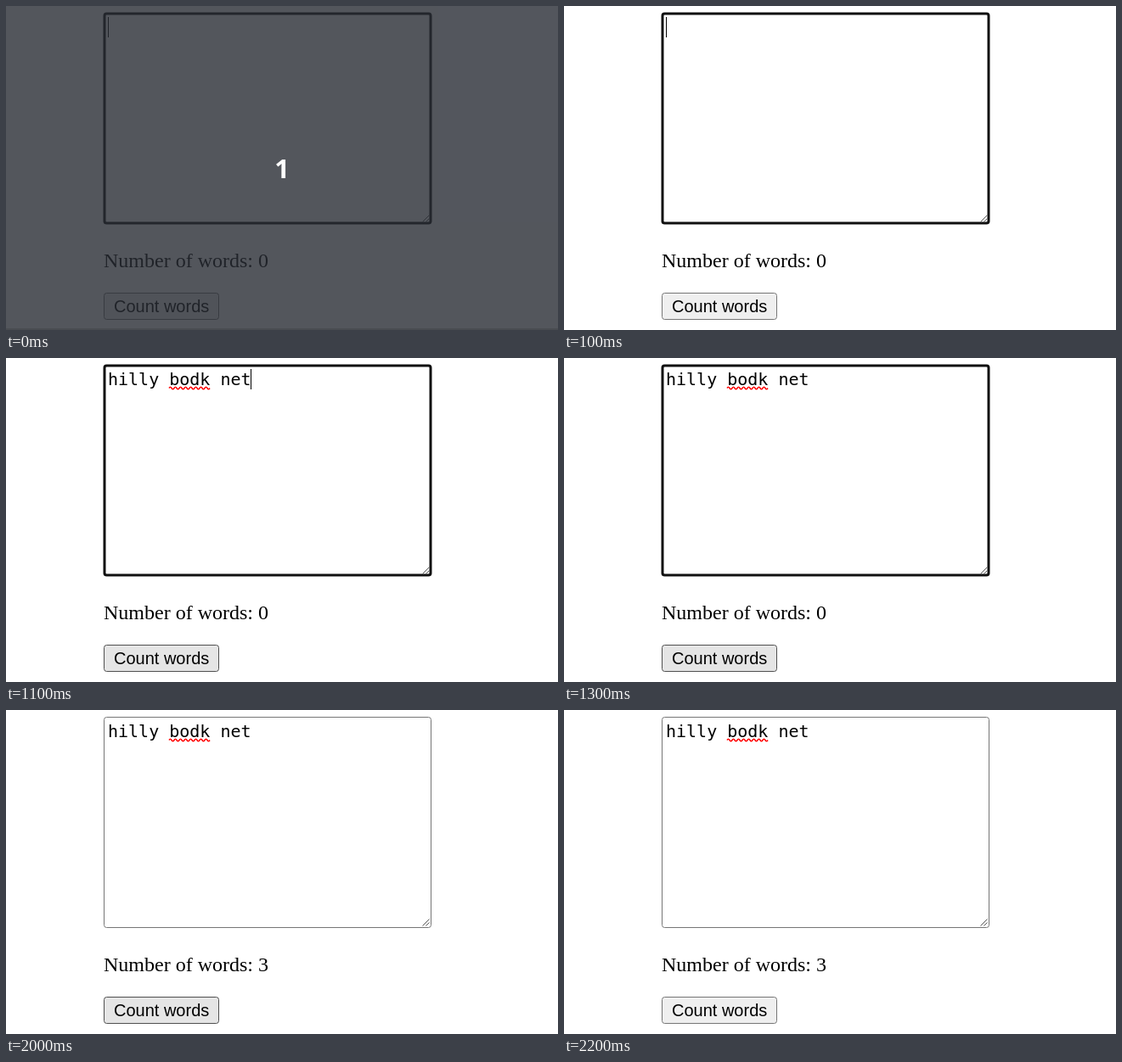
Recreate the animation shown at these times as an HTML page. Size 650 by 382 pixels, loop 3300 ms.

```html
<!DOCTYPE html>
<html lang="en">
<head>
<meta charset="utf-8">
<title>Word counter</title>
<style>
  html, body { margin: 0; width: 100%; height: 100%; overflow: hidden; background: #fff; }
  svg { display: block; }
  text { white-space: pre; }
  .mono { font: 20px "DejaVu Sans Mono", monospace; }
  .serif { font: 24px "Liberation Serif", serif; }
  .sans { font: 20px "Liberation Sans", sans-serif; }
  .count { font: 600 31px "Noto Sans", sans-serif; }
</style>
</head>
<body>
<svg width="650" height="382" viewBox="0 0 650 382">
  <rect id="box" x="115.5" y="8.5" width="385" height="248" rx="3" fill="#fff" stroke="#767676"/>
  <rect id="ring" x="116" y="9" width="384" height="247" rx="2.5" fill="none" stroke="#101010" stroke-width="3"/>
  <path d="M490.5 254.5l8-8M494.5 254.5l4-4" stroke="#555" fill="none"/>
  <g id="typed">
    <text class="mono" x="120" y="32">hilly bodk net</text>
    <path id="wave" fill="none" stroke="#f00" stroke-width="1.5"/>
  </g>
  <rect id="caret" y="13" width="1" height="24"/>
  <text id="total" class="serif" x="115" y="308"></text>
  <rect id="button" x="115.5" y="338.5" width="135" height="31" rx="3"/>
  <text class="sans" x="127" y="361">Count words</text>
  <g id="countdown">
    <rect width="650" height="382" fill="#282c34" fill-opacity=".8"/>
    <rect y="380" width="650" height="2" fill="#000" fill-opacity=".12"/>
    <text class="count" x="325" y="203" text-anchor="middle" fill="#fff">1</text>
  </g>
</svg>
<script>
const LOOP = 3300;
const $ = id => document.getElementById(id);
const show = (id, on) => $(id).setAttribute('visibility', on ? 'visible' : 'hidden');
const looks = {
  normal: ['#efefef', '#767676'],
  hover: ['#e5e5e5', '#4f4f4f'],
  pressed: ['#f5f5f5', '#8d8d8d']
};

$('wave').setAttribute('d', 'M192 35.5' + 'q1.5 -2.4 3 0t3 0'.repeat(8));

function buttonLook(t) {
  if (t < 1100 || t >= 2200) return looks.normal;
  return t >= 1700 && t < 2000 ? looks.pressed : looks.hover;
}

function draw() {
  const t = performance.now() % LOOP;
  const typed = t >= 700;
  const focused = t < 1700;
  show('countdown', t < 100);
  show('typed', typed);
  show('ring', focused);
  show('box', !focused);
  show('caret', t < 600 || (typed && t < 1300));
  $('caret').setAttribute('x', typed ? 288 : 120);
  $('total').textContent = 'Number of words: ' + (t < 2000 ? 0 : 3);
  const [fill, stroke] = buttonLook(t);
  $('button').setAttribute('fill', fill);
  $('button').setAttribute('stroke', stroke);
  requestAnimationFrame(draw);
}
draw();
</script>
</body>
</html>
```
